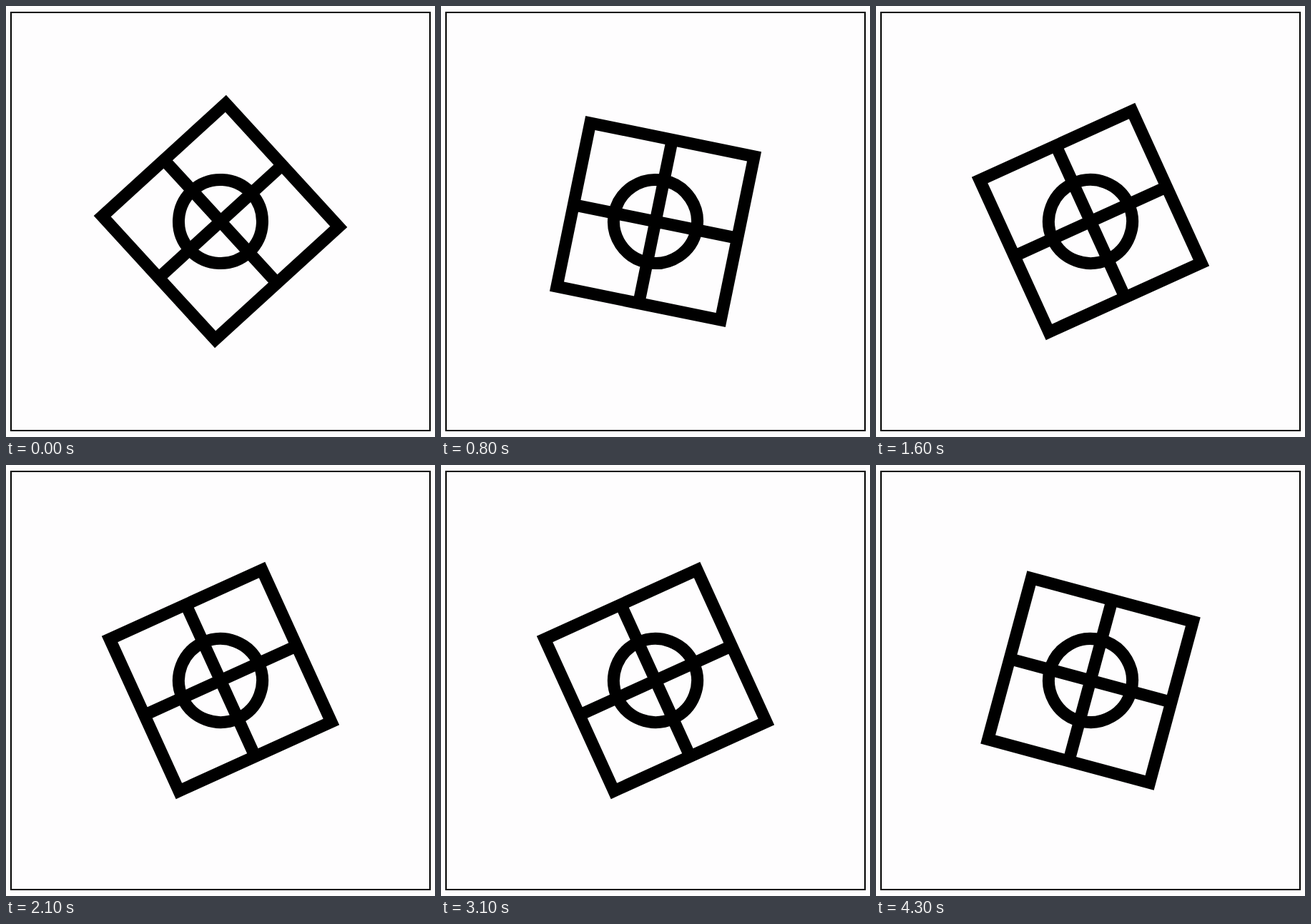
These frames come from a looping animation (600 px wide and 604 px high, 4.4 s). An HTML page:

```html
<!DOCTYPE html>
<html lang="en">
<head>
<meta charset="utf-8">
<title>Spinning window</title>
<style>
  html, body { margin: 0; width: 100%; height: 100%; overflow: hidden; background: #fefdfe; }
  svg { display: block; width: 100%; height: 100%; }
</style>
</head>
<body>
<svg viewBox="0 0 600 604" fill="none" stroke="#000">
  <rect width="600" height="604" fill="#fefdfe" stroke="none"/>
  <rect x="7" y="9" width="586" height="586" stroke-width="2"/>
  <g id="spinner" stroke-width="17">
    <rect x="-117" y="-117" width="234" height="234"/>
    <circle r="58.5"/>
    <path d="M-117 0H117M0-117V117"/>
  </g>
</svg>
<script>
  const LOOP = 4400;
  const TICK = 100;
  const START = 47.55;      // degrees
  const SPEED = 108;        // degrees per tick
  const BRAKE_AT = 36.58;   // tick at which the spin begins to slow
  const BRAKE = 6.466;      // half the deceleration per tick squared

  const spinner = document.getElementById('spinner');

  function angleAt(tick) {
    const braking = Math.max(0, tick - BRAKE_AT);
    return (START + SPEED * tick - BRAKE * braking * braking) % 360;
  }

  function render(ms) {
    const tick = Math.floor((ms % LOOP) / TICK);
    spinner.setAttribute('transform', `translate(300 302) rotate(${angleAt(tick)})`);
  }

  const begin = performance.now();
  function loop() {
    render(performance.now() - begin);
    requestAnimationFrame(loop);
  }
  loop();
</script>
</body>
</html>
```
